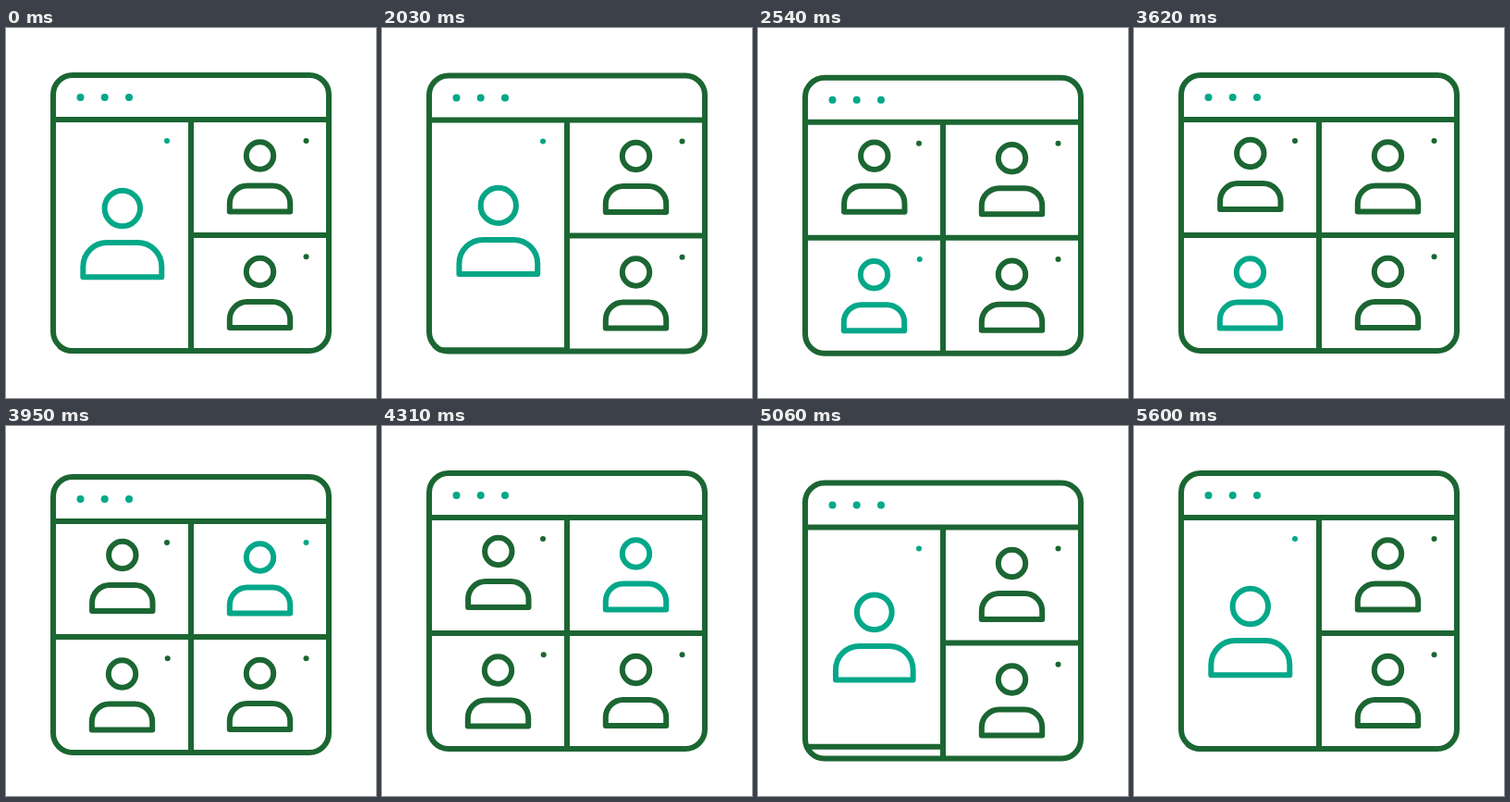
Write an HTML page with a canvas that moves like this. It is 400x400 px and loops after 5.63 s.

```html
<!DOCTYPE html>
<html lang="en">
<head>
<meta charset="utf-8">
<title>Video call layouts</title>
<style>
  html, body { margin: 0; width: 100%; height: 100%; overflow: hidden; background: #fff; }
  canvas { display: block; width: 400px; height: 400px; }
</style>
</head>
<body>
<canvas id="stage" width="400" height="400"></canvas>
<script>
const ctx = document.getElementById('stage').getContext('2d');
const LOOP = 5630, SPLIT = 2000, SPEAKER = 3733, MERGE = 4700;
const DARK = [27, 102, 50], TEAL = [3, 168, 137];

const lerp = (a, b, p) => a + (b - a) * p;
const ease = (t, start, length) => {
  const x = Math.min(1, Math.max(0, (t - start) / length));
  return (1 - Math.cos(Math.PI * x)) / 2;
};
const bounce = (t, start, height, rise, fall) =>
  height * (ease(t, start, rise) - ease(t, start + rise, fall));
const within = (t, from, to) => t >= from && t < to;
const mix = p => `rgb(${DARK.map((c, i) => Math.round(lerp(c, TEAL[i], p)))})`;

function line(x1, y1, x2, y2) {
  ctx.beginPath();
  ctx.moveTo(x1, y1);
  ctx.lineTo(x2, y2);
  ctx.stroke();
}

function dot(x, y, r, color) {
  ctx.fillStyle = color;
  ctx.beginPath();
  ctx.arc(x, y, r, 0, 2 * Math.PI);
  ctx.fill();
}

// (x, y) is the centre of the head; size runs from 0 (small) to 1 (large).
function person(x, y, color, size = 0) {
  const half = lerp(32.7, 42.5, size), corner = lerp(19, 26, size);
  const top = y + lerp(32.5, 37, size), bottom = y + lerp(60.5, 74.2, size);
  ctx.strokeStyle = color;
  ctx.beginPath();
  ctx.arc(x, y, lerp(14.7, 19.2, size), 0, 2 * Math.PI);
  ctx.stroke();
  ctx.beginPath();
  ctx.roundRect(x - half, top, 2 * half, bottom - top, [corner, corner, 0, 0]);
  ctx.stroke();
}

function draw(t) {
  const merging = t >= MERGE;
  const shift = bounce(t, SPLIT, 13, 233, 440) + bounce(t, SPEAKER, 4, 200, 233)
    + bounce(t, MERGE, 13, 233, 440);
  const single = 1 - ease(t, SPLIT, 455) + ease(t, MERGE, 455);
  const size = 1 - ease(t, SPLIT, 435) + ease(t, MERGE, 435);
  const toLeft = ease(t, SPLIT, 233), toRight = ease(t, SPEAKER, 233), back = ease(t, MERGE, 233);
  const topLeft = mix(1 - toLeft + back);
  const bottomLeft = mix(t < SPEAKER ? 1 : 1 - toRight);
  const topRight = mix(toRight - back);
  const dark = mix(0), teal = mix(1);
  const drop = 125 * single;
  const largeY = within(t, SPLIT + 20, MERGE) ? 192.1 : 195;

  ctx.clearRect(0, 0, 400, 400);
  ctx.save();
  ctx.translate(0, shift);
  ctx.lineWidth = 6;
  ctx.lineJoin = 'round';

  // The lower left cell slides past the window's bottom edge.
  ctx.save();
  ctx.beginPath();
  ctx.roundRect(48, 48, 304, 304, 23);
  ctx.clip();
  person(125.5, 264 + drop, bottomLeft);
  if (!within(t, 3140, 3320) && !within(t, 3620, 3740)) dot(174.7, 247.3 + drop, 3, bottomLeft);
  ctx.strokeStyle = dark;
  line(51, 224 + drop, 200, 224 + drop);
  ctx.restore();

  person(125.8, lerp(135.5, largeY, size), topLeft, size);
  dot(174, 122, 3, topLeft);
  person(274.5, 138, topRight);
  if (!within(t, 4310, 4520)) dot(324.5, 122, 3, topRight);
  person(274.5, 263.5, dark);
  dot(324.5, 247.3, 3, dark);

  ctx.strokeStyle = dark;
  line(51, 99, 349, 99);
  line(200, 99, 200, 349);
  line(200, 224, 349, 224);
  ctx.beginPath();
  ctx.roundRect(51, 51, 298, 298, 21);
  ctx.stroke();
  for (const x of [80.5, 106.7, 133]) dot(x, 75, 4, teal);
  ctx.restore();
}

const begin = performance.now();
function tick() {
  draw((performance.now() - begin) % LOOP);
  requestAnimationFrame(tick);
}
tick();
</script>
</body>
</html>
```
